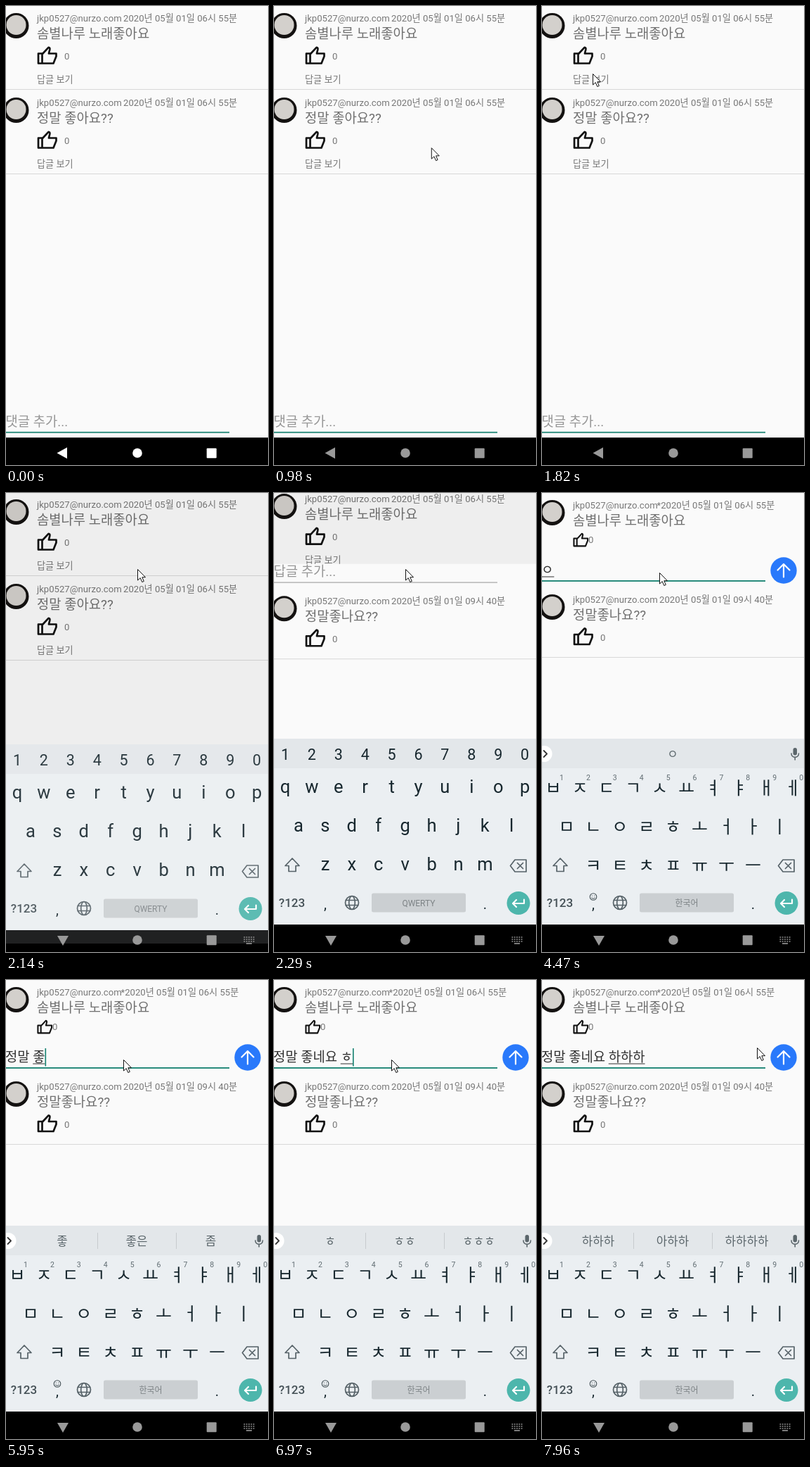
Recreate the animation shown at these times as an HTML page. Size 373 px wide and 652 px high, loop 8000 ms.

```html
<!DOCTYPE html>
<html lang="ko">
<head>
<meta charset="utf-8">
<style>
  html, body { margin: 0; width: 100%; height: 100%; overflow: hidden; background: #fafafa; }
  svg { display: block; }
  text { font-family: Roboto, 'Noto Sans CJK KR', 'Noto Sans CJK', sans-serif; white-space: pre; }
  .mid { text-anchor: middle; }
  .meta { font-size: 13.15px; fill: #777; }
  .body { font-size: 18.8px; fill: #707070; }
  .hint { font-size: 18.8px; fill: #979797; }
  .key { fill: #17272e; }
  .line { fill: none; stroke-linecap: round; stroke-linejoin: round; }
</style>
</head>
<body>
<svg id="stage" width="373" height="652" viewBox="0 0 373 652">
  <defs>
    <g id="thumb" fill="none" stroke="#111" stroke-width="2.7" stroke-linejoin="round">
      <path d="M2.5 10.5H8V24.500H2.5ZM8 11.5L17 1.8Q19.4 2 18.8 5L17.4 10.5H28V14.5L24 24.500H8"/>
    </g>
    <g id="avatar">
      <circle r="18" fill="#141211"/>
      <circle cy="-1" r="14" fill="#d3d0cc"/>
    </g>
    <clipPath id="wipe"><rect id="wipeBox" width="373" height="652"/></clipPath>
  </defs>

  <rect width="373" height="652" fill="#fafafa"/>
  <g id="list"></g>
  <rect id="dim" width="373" height="652"/>
  <g clip-path="url(#wipe)"><g id="thread"></g></g>

  <g id="board">
    <rect y="349" width="373" height="264" fill="#ebeff2"/>
    <rect y="349" width="373" height="42" fill="#e3e7ea"/>
    <g id="latin"></g>
    <g id="korean"></g>
    <g class="line" stroke="#566268" stroke-width="1.7">
      <path d="M26 519L36 529.5H31V537.5H21V529.5H16Z"/>
      <path d="M343 521H359V538H343L336.5 529.5ZM346.5 525.5L354.5 533.5M354.5 525.5L346.5 533.5"/>
      <circle cx="111" cy="582" r="9.5"/>
      <ellipse cx="111" cy="582" rx="4.3" ry="9.5"/>
      <path d="M102.5 578.5H119.5M102.5 585.5H119.5"/>
    </g>
    <text class="mid" x="25.5" y="588" font-size="17" font-weight="500" fill="#455157">?123</text>
    <text class="mid key" x="73" y="591" font-size="20">,</text>
    <text class="mid key" x="300.5" y="591" font-size="20">.</text>
    <rect x="139" y="568.5" width="134" height="27" rx="2.5" fill="#cbcfd2"/>
    <text id="space" class="mid" x="206" y="586.5" font-size="12" fill="#7d8386"></text>
    <circle cx="348" cy="582.5" r="16.5" fill="#4db6ac"/>
    <path class="line" d="M356 577.5V583H340.5M345 578L340 583L345 588" stroke="#fff" stroke-width="2.2"/>
  </g>

  <rect id="nav" y="613" width="373" height="39"/>
  <rect id="navBand" y="621" width="373" height="19" fill="#202122"/>
  <g id="icons">
    <path id="back"/>
    <circle cx="187" cy="635" r="6.8"/>
    <rect x="285.7" y="628.3" width="14" height="14" rx="1"/>
    <g id="switch">
      <path d="M338.5 631H353.5M338.5 634H353.5M338.5 637H353.5" stroke="#999" stroke-width="1.7" stroke-dasharray="1.8 1.5"/>
      <path d="M342 640H350" stroke="#999" stroke-width="1.6"/>
    </g>
  </g>

  <circle id="tap" r="12" fill="#fff45c" opacity=".75"/>
  <path id="mouse" d="M.5 .5V16L4.2 12.6L6.8 18.5L9.3 17.4L6.8 11.7H11.5Z" fill="#fff" stroke="#111" stroke-linejoin="round"/>
</svg>

<script>
const $ = id => document.getElementById(id);
const LOOP = 8000, TEAL = '#13806f';
const MAIL = 'jkp0527@nurzo.com', DAY = '2020년 05월 01일 ', SONG = '솜별나루 노래좋아요';

const text = (x, y, cls, s, extra = '') => `<text x="${x}" y="${y}" class="${cls}" ${extra}>${s}</text>`;
const rule = (y, w = 373, color = '#d8d8d8', h = 1) => `<rect y="${y}" width="${w}" height="${h}" fill="${color}"/>`;

// Avatar, author, date and message; every comment shares them
const head = (y, time, message, star) =>
  `<use href="#avatar" x="14.5" y="${y + 28}"/>` + text(44, y + 21.5, 'meta', MAIL) +
  text(star ? 163.5 : 167, y + 21.5, 'meta', (star ? '*' : '') + DAY + time) +
  text(44, y + 46, 'body', message);
const likes = y => `<use href="#thumb" x="43.5" y="${y - 1}"/>` + text(83, y + 18, 'meta', '0');

const listItem = (y, message) => head(y, '06시 55분', message) + likes(y + 58) +
  text(44, y + 108.5, 'meta', '답글 보기') + rule(y + 118);

$('list').innerHTML = listItem(0, SONG) + listItem(120, '정말 좋아요??') +
  text(-.5, 597, 'hint', '댓글 추가...') + rule(604.8, 318, TEAL, 1.7) +
  `<rect id="listCaret" y="579" width="1.5" height="24" fill="${TEAL}"/>`;

$('thread').innerHTML = '<rect width="373" height="690" fill="#fafafa"/>' +
  head(0, '06시 55분', SONG, true) +
  '<use href="#thumb" transform="translate(43.5 56.5) scale(.77)"/>' + text(66, 70.5, 'meta', '0') +
  text(-.5, 116, 'hint', '답글 추가...', 'id="hint"') +
  '<rect id="fieldLine" width="318"/>' +
  text(-1, 116, 'body', '', 'id="field" style="fill:#303030"') +
  '<rect id="compose" y="118.5" height="1" fill="#333"/>' +
  `<rect id="caret" y="97" width="1.6" height="25.5" fill="${TEAL}"/>` +
  `<g id="send"><circle cx="344" cy="110" r="18.7" fill="#2979fb"/>
   <path class="line" d="M344 119.5V101M335.5 109.5L344 101L352.5 109.5" stroke="#fff" stroke-width="2.2"/></g>` +
  head(134, '09시 40분', '정말좋나요??') + likes(191.5) + rule(233);

// Keyboard rows: key centres are 37.9 px apart
const row = (keys, x, y, size) => [...keys].map((k, i) =>
  text((x + i * 37.9).toFixed(1), y, 'mid key', k, `font-size="${size}"`)).join('');
const DIGITS = '1234567890';

$('latin').innerHTML = row(DIGITS, 16, 379, 21.5) + row('qwertyuiop', 16, 426, 25.5) +
  row('asdfghjkl', 35, 481, 25.5) + row('zxcvbnm', 73, 536, 25.5);
$('korean').innerHTML = row('ㅂㅈㄷㄱㅅㅛㅕㅑㅐㅔ', 16, 428, 25) +
  `<g opacity=".65">${row(DIGITS, 28, 408, 10.5)}</g>` +
  row('ㅁㄴㅇㄹㅎㅗㅓㅏㅣ', 35, 483, 25) + row('ㅋㅌㅊㅍㅠㅜㅡ', 73, 538, 25) +
  `<circle cx="3" cy="370.5" r="11.5" fill="#fff"/>
   <path class="line" d="M2.5 366L7 370.5L2.5 375" stroke="#333" stroke-width="1.8"/>
   <rect x="357.5" y="362" width="5.5" height="10.5" rx="2.7" fill="#5b666b"/>
   <path class="line" d="M355 370C355 377 365.5 377 365.5 370M360.2 375.5V379" stroke="#5b666b" stroke-width="1.6"/>
   <g class="line" stroke="#455157" stroke-width="1.1"><circle cx="73" cy="573.5" r="4.8"/>
   <path d="M70.7 575Q73 577.5 75.3 575M71.3 572V572.3M74.7 572V572.3"/></g>
   <path id="bars" d="M130.5 359V382M242.5 359V382" stroke="#c6cbce"/>` +
  [80, 186, 291.5].map((x, i) =>
    text(x, 377, 'mid', '', `id="word${i}" font-size="16.8" fill="#5b666b"`)).join('');

// time, committed text, composing text, suggestions
const TYPING = [
  [0, '', '', ''],
  [3930, '', 'ㅇ', ',ㅇ,'],
  [4620, '', '', ''],
  [4930, '', 'ㅈ', ',ㅈ,'],
  [5080, '', '정', '정,저,전'],
  [5250, '', '정ㅁ', '정ㅁ,정말,정'],
  [5320, '', '정마', '정마,정말,정만'],
  [5400, '', '정말', '정말,정말로,정말요'],
  [5640, '정말 ', '', '너무,좋아,감사'],
  [5790, '정말 ', 'ㅈ', '좀,좋은,잘'],
  [5870, '정말 ', '조', '조,좋은,좀'],
  [5950, '정말 ', '좋', '좋,좋은,좀'],
  [6100, '정말 ', '좋ㄴ', '좋ㄴ,좋네,좋은'],
  [6180, '정말 ', '좋네', '좋네,좋네요,좋네여'],
  [6250, '정말 ', '좋넹', '좋넹,좋네요,좋네여'],
  [6330, '정말 ', '좋네요', '좋네요,좋네용,좋네여'],
  [6800, '정말 좋네요 ', '', '^^,ㅎㅎ,좋네여'],
  [6970, '정말 좋네요 ', 'ㅎ', 'ㅎ,ㅎㅎ,ㅎㅎㅎ'],
  [7040, '정말 좋네요 ', '하', '하,하하,한'],
  [7120, '정말 좋네요 ', '핳', '핳,하하,핳하'],
  [7190, '정말 좋네요 ', '하하', '하하,하하하,아하'],
  [7340, '정말 좋네요 ', '하핳', '하핳,하하하,아핳'],
  [7420, '정말 좋네요 ', '하하하', '하하하,아하하,하하하하']
];

// time, x, y of the pointer tip
const POINTER = [
  [70, 316, 624], [590, 307, 262], [760, 307, 262], [1360, 80, 96], [1520, 81, 96],
  [1590, 72, 96], [1950, 72, 96], [2140, 187, 108], [2500, 187, 108], [2770, 167, 113],
  [7805, 167, 113], [7960, 306, 96], [LOOP, 306, 96]
];

const ramp = (t, a, b) => Math.min(1, Math.max(0, (t - a) / (b - a)));
const within = (t, a, b) => t >= a && t < b;
const show = (id, on) => $(id).setAttribute('visibility', on ? 'inherit' : 'hidden');
const set = (id, attrs) => { for (const k in attrs) $(id).setAttribute(k, attrs[k]); };
const shift = (id, x, y) => set(id, { transform: `translate(${x} ${y})` });

function pointer(t) {
  const i = Math.max(1, POINTER.findIndex(p => p[0] > t));
  const [a, ax, ay] = POINTER[i - 1], [b, bx, by] = POINTER[i];
  const k = ramp(t, a, b);
  return [ax + (bx - ax) * k, ay + (by - ay) * k];
}

function fieldWidth(s) {
  $('field').textContent = s;
  return s ? $('field').getComputedTextLength() : 0;
}

function drawField(t) {
  const [since, done, typing, words] = TYPING.filter(s => s[0] <= t).pop();
  const from = fieldWidth(done), to = fieldWidth(done + typing);
  const focused = t >= 3070, filled = to > 0;
  set('compose', { x: Math.max(0, from - 1), width: Math.max(0, to - from) });
  set('caret', { x: Math.max(0, to - 1) });
  const blinkStart = Math.max(since, 3100);
  show('caret', focused && (t - blinkStart) % 1000 < (since ? 460 : 520));
  show('hint', !filled);
  show('send', filled);
  set('fieldLine', focused ? { y: 124, height: 1.8, fill: TEAL } : { y: 124.3, height: 1, fill: '#929292' });
  const list = words.split(',');
  for (let i = 0; i < 3; i++) $('word' + i).textContent = list[i] || '';
  show('bars', !!list[0]);
}

function render(t) {
  // Opening the thread: keyboard rises, then the page wipes upward
  const wipe = 1 - (1 - ramp(t, 2140, 2460)) ** 2;
  const rise = ramp(t, 1985, 2125), settle = 1 - ramp(t, 2145, 2290);
  const drop = rise < 1 ? 264 - 256 * rise : 8 * settle;
  shift('list', 0, -ramp(t, 1990, 2140) - 11 * wipe);
  set('dim', { opacity: .048 * ramp(t, 1990, 2120) });
  shift('thread', 0, 8 * (1 - wipe));
  show('thread', t >= 2140);
  set('wipeBox', { y: 357 * (1 - wipe) });
  shift('board', 0, drop);
  set('board', { opacity: 1 - .1 * settle });
  show('board', t >= 1990);
  set('nav', { y: 613 + (t >= 1990 ? Math.min(8, drop) : 0) });
  show('navBand', within(t, 2060, 2290));

  const korean = t >= 3070;
  show('latin', !korean);
  show('korean', korean);
  $('space').textContent = korean ? '한국어' : 'QWERTY';

  const grey = Math.round(255 - 102 * ramp(t, 70, 300));
  set('icons', { fill: `rgb(${grey},${grey},${grey})` });
  set('back', { d: t < 1990 ? 'M72.5 635L87 627V643Z' : 'M73 629H89L81 643Z' });
  show('switch', t >= 1990);
  show('listCaret', within(t, 330, 830) || within(t, 1330, 1820));

  const [x, y] = pointer(t);
  shift('mouse', x, y);
  shift('tap', x, y);
  show('mouse', t >= 70);
  show('tap', within(t, 1600, 1800) || within(t, 3000, 3070));
  drawField(t);
}

let start;
function tick(now) {
  start ??= now;
  render((now - start) % LOOP);
  requestAnimationFrame(tick);
}
render(0);
requestAnimationFrame(tick);
</script>
</body>
</html>
```
